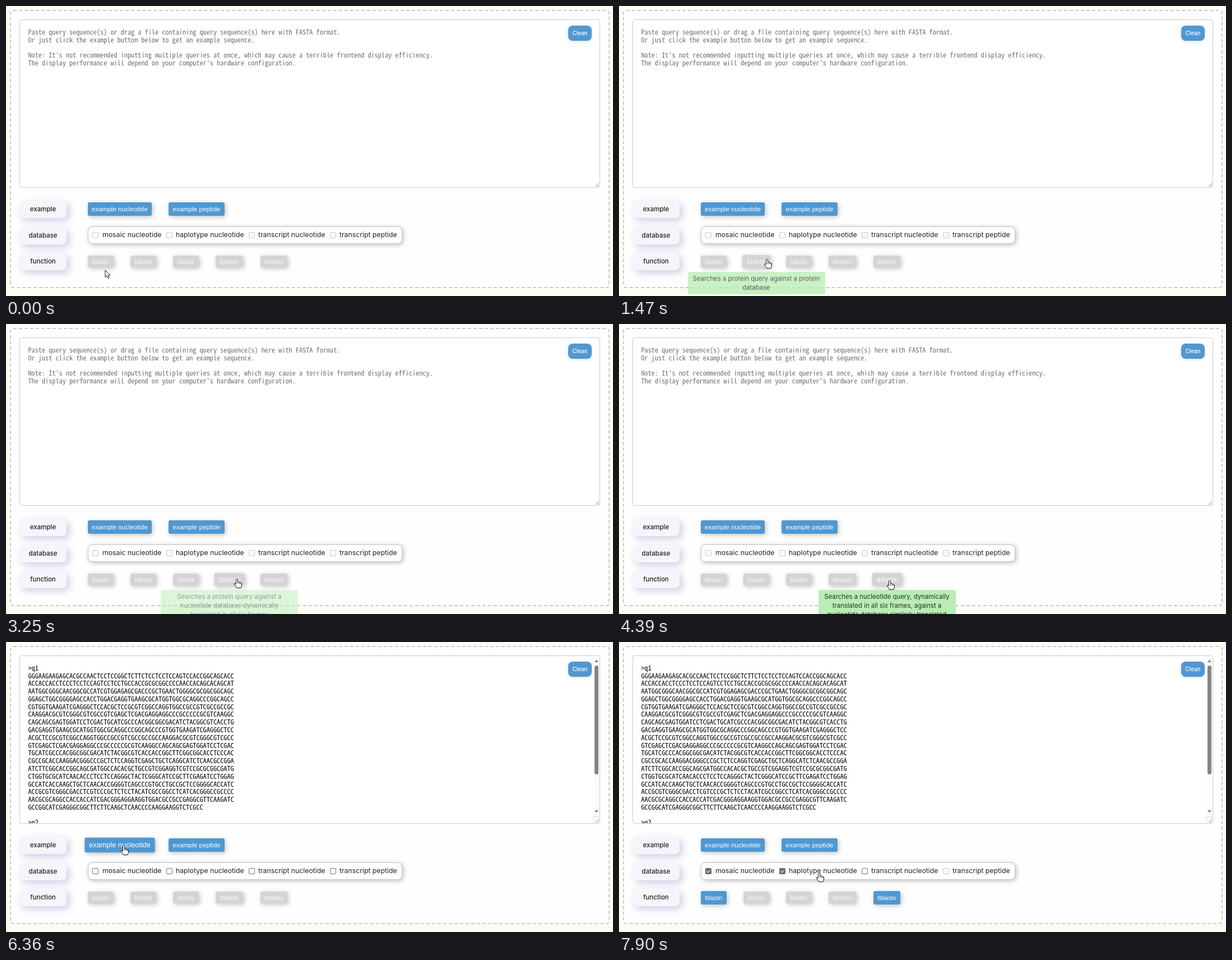
Animation of 1083x517 px, one loop 8000 ms. Source, as an HTML page:

```html
<!DOCTYPE html>
<html lang="en">
<head>
<meta charset="utf-8">
<title>Sequence search form</title>
<style>
  html, body { margin: 0; width: 100%; height: 100%; overflow: hidden; background: #fafdf1; }
  #stage { position: relative; width: 1083px; height: 517px; overflow: hidden; font: 12.25px/16px Inter, sans-serif; color: #222; }
  #stage div, #stage pre, #stage svg { position: absolute; box-sizing: border-box; white-space: pre; margin: 0; }
  #panel { left: 7px; top: 7px; width: 1070px; height: 496px; border: 2px dashed #c5cdc9; border-radius: 6px; background: #fdfefd; }
  #area { left: 24px; top: 24px; width: 1036px; height: 300px; border: 1px solid #ccc; border-radius: 4px; background: #fff; overflow: hidden; }
  #area pre { left: 14.5px; top: 14.8px; font: 300 12.24px/13.78px "Noto Sans Mono CJK SC", "Noto Sans Mono CJK JP", "Liberation Mono", monospace; letter-spacing: calc(6.12px - 1ch); }
  #hint { color: #707070; }
  #seq { color: #000; }
  #area svg { left: 0; top: 0; }
  .tag { left: 24px; width: 84px; height: 31px; border-radius: 8px; background: #f5f5fb; box-shadow: 5px 5px 13px #cfcfe6; font-size: 11.5px; font-weight: 500; line-height: 31px; text-align: center; }
  .btn { border-radius: 3px; background: #5098d2; color: #fff; box-shadow: 2px 2px 8px rgba(0, 0, 0, .24); font: 11.6px "Liberation Sans", sans-serif; text-align: center; }
  #clean { left: 1003px; top: 35px; width: 42px; height: 27px; border-radius: 8px; box-shadow: 0 1px 6px rgba(0, 0, 0, .15); font: 500 9.8px/27px Inter, sans-serif; }
  #data { left: 146px; top: 393px; width: 561px; height: 31px; border: 1px solid #c4c4c4; border-radius: 8px; background: #fff; box-shadow: 2px 2px 8px rgba(0, 0, 0, .25); }
  .box { top: 403px; width: 11px; height: 11px; border: 1px solid #c9c9c9; border-radius: 2px; background: #fafafa; }
  .box.on { border-color: #767676; background: #fff; }
  .box.checked { border-color: #6a6a6a; background: #6a6a6a; }
  .box.checked::after { content: ""; position: absolute; left: 2.5px; top: 0; width: 2.5px; height: 5.5px; border: solid #fff; border-width: 0 1.5px 1.5px 0; transform: rotate(42deg); }
  .tip { top: 474px; width: 245px; padding: 4px 0 3.5px; border-radius: 4px; background: #b9edb5; color: #2d2d2d; font-size: 11.35px; text-align: center; }
  .cursor { left: 0; top: 0; overflow: visible; fill: #fff; stroke: #111; stroke-linejoin: round; }
</style>
</head>
<body>
<div id="stage">
  <div id="panel"></div>
  <div id="area">
<pre id="hint">Paste query sequence(s) or drag a file containing query sequence(s) here with FASTA format.
Or just click the example button below to get an example sequence.

Note: It's not recommended inputting multiple queries at once, which may cause a terrible frontend display efficiency.
The display performance will depend on your computer's hardware configuration.</pre>
<pre id="seq">&gt;q1
GGGAAGAAGAGCACGCCAACTCCTCCGGCTCTTCTCCTCCTCCAGTCCACCGGCAGCACC
ACCACCACCTCCCTCCTCCAGTCCTCCTGCCACCGCGCGGCCCCAACCACAGCACAGCAT
AATGGCGGGCAACGGCGCCATCGTGGAGAGCGACCCGCTGAACTGGGGCGCGGCGGCAGC
GGAGCTGGCGGGGAGCCACCTGGACGAGGTGAAGCGCATGGTGGCGCAGGCCCGGCAGCC
CGTGGTGAAGATCGAGGGCTCCACGCTCCGCGTCGGCCAGGTGGCCGCCGTCGCCGCCGC
CAAGGACGCGTCGGGCGTCGCCGTCGAGCTCGACGAGGAGGCCCGCCCCCGCGTCAAGGC
CAGCAGCGAGTGGATCCTCGACTGCATCGCCCACGGCGGCGACATCTACGGCGTCACCTG
GACGAGGTGAAGCGCATGGTGGCGCAGGCCCGGCAGCCCGTGGTGAAGATCGAGGGCTCC
ACGCTCCGCGTCGGCCAGGTGGCCGCCGTCGCCGCCGCCAAGGACGCGTCGGGCGTCGCC
GTCGAGCTCGACGAGGAGGCCCGCCCCCGCGTCAAGGCCAGCAGCGAGTGGATCCTCGAC
TGCATCGCCCACGGCGGCGACATCTACGGCGTCACCACCGGCTTCGGCGGCACCTCCCAC
CGCCGCACCAAGGACGGGCCCGCTCTCCAGGTCGAGCTGCTCAGGCATCTCAACGCCGGA
ATCTTCGGCACCGGCAGCGATGGCCACACGCTGCCGTCGGAGGTCGTCCGCGCGGCGATG
CTGGTGCGCATCAACACCCTCCTCCAGGGCTACTCGGGCATCCGCTTCGAGATCCTGGAG
GCCATCACCAAGCTGCTCAACACCGGGGTCAGCCCGTGCCTGCCGCTCCGGGGCACCATC
ACCGCGTCGGGCGACCTCGTCCCGCTCTCCTACATCGCCGGCCTCATCACGGGCCGCCCC
AACGCGCAGGCCACCACCATCGACGGGAGGAAGGTGGACGCCGCCGAGGCGTTCAAGATC
GCCGGCATCGAGGGCGGCTTCTTCAAGCTCAACCCCAAGGAAGGTCTCGCC

&gt;q2</pre>
    <svg width="1034" height="298">
      <g id="bar" fill="#858585">
        <path d="M1023 0h11v298h-11z" fill="#fcfcfc"/>
        <path d="M1023 286.5h11M1023.5 286v12" stroke="#ddd"/>
        <path d="M1025 11l3.5-4.5 3.5 4.5zM1025 275l3.5 4.5 3.5-4.5z"/>
        <rect x="1025" y="17" width="7" height="194" rx="3.5"/>
      </g>
      <path d="M1027 297l6-6M1031 297l2-2" stroke="#777" stroke-width=".9"/>
    </svg>
  </div>
  <div id="clean" class="btn">Clean</div>
  <div id="data"></div>
</div>
<script>
const stage = document.getElementById('stage');
const byId = id => document.getElementById(id);

function add(cls, text, style) {
  const el = document.createElement('div');
  el.className = cls;
  el.textContent = text;
  for (const k in style) el.style[k] = style[k] + 'px';
  return stage.appendChild(el);
}
const button = (text, left, top, width, height) =>
  add('btn', text, { left, top, width, height, lineHeight: height });

['example', 'database', 'function'].forEach((name, i) => add('tag', name, { top: 347 + i * 46.5 }));

const boxes = [['mosaic nucleotide', 154, 172], ['haplotype nucleotide', 286, 303],
  ['transcript nucleotide', 433, 450], ['transcript peptide', 578, 595]].map(([text, x, tx]) => {
  add('', text, { left: tx, top: 400 });
  return add('box', '', { left: x });
});

const example = { el: button('example nucleotide', 146, 350, 114, 24), on: 5380, off: 6560 };
button('example peptide', 290, 350, 100, 24);

// name, left, width, hover start, hover end, description
const tools = [
  ['blastn', 146, 46, 380, 820, 'Searches a nucleotide query against a\nnucleotide database'],
  ['blastp', 222, 46, 1200, 1800, 'Searches a protein query against a protein\ndatabase'],
  ['blastx', 298, 46, 2130, 2560, 'Searches a nucleotide query, dynamically\ntranslated in all six frames, against a\nprotein database'],
  ['tblastn', 374, 49, 3060, 3560, 'Searches a protein query against a\nnucleotide database dynamically\ntranslated in all six frames'],
  ['tblastx', 454, 48, 3940, 4720, 'Searches a nucleotide query, dynamically\ntranslated in all six frames, against a\nnucleotide database similarly translated\nin all six frames']
].map(([name, x, w, on, off, text]) => ({
  el: button(name, x, 445, w, 21), on, off,
  tip: add('tip', text, { left: x + w / 2 - 122.5 })
}));

stage.insertAdjacentHTML('beforeend', `
  <svg class="cursor" width="20" height="22"><path d="M0 0V12.5L3 9.8L5.2 14.6L7.3 13.7L5.2 9H9Z"/></svg>
  <svg class="cursor" width="20" height="22"><path d="M-1.6 1.4Q0-1 1.6 1.4V6Q4 5 4.4 6.8Q6.4 5.8 6.8 7.6Q8.5 7 8.5 9V12Q8 14 7 16.5H-.5Q-2 13-5 10Q-4.6 7.8-2.8 8.9L-1.6 10Z"/><path d="M1.6 6v3M4.4 7v2.5M6.8 8v2" stroke-width=".8"/></svg>`);
const [arrow, hand] = document.querySelectorAll('.cursor');

// time, x, y of the pointer tip
const path = [[0, 177, 471], [150, 177, 471], [380, 173, 463], [600, 175, 454], [820, 193, 452],
  [1200, 224, 452], [1470, 264, 451], [1800, 269, 451], [2130, 299, 450], [2430, 322, 450],
  [2560, 346, 451], [3060, 375, 453], [3250, 412, 454], [3560, 424, 455], [3940, 455, 457],
  [4390, 483, 457], [4710, 483, 457], [5100, 360, 416], [5380, 245, 373], [5550, 210, 363],
  [6360, 210, 363], [6560, 214, 376], [6900, 226, 403], [7100, 230, 411], [7220, 230, 411],
  [7750, 350, 411], [7900, 357, 411], [8000, 357, 411]];

const LOAD = 5700, PICK1 = 7100, PICK2 = 7850;
const smooth = u => { u = Math.min(1, Math.max(0, u)); return u * u * (3 - 2 * u); };
const hover = (t, { on, off }, ms) => smooth((t - on) / ms) * (1 - smooth((t - off) / ms));
const mix = (a, b, u) => `rgb(${a.map((v, i) => v + (b[i] - v) * u)})`;

function pointer(t) {
  const i = path.findIndex(p => p[0] > t);
  const [t0, x0, y0] = path[i - 1], [t1, x1, y1] = path[i];
  const u = (t - t0) / (t1 - t0);
  return [x0 + (x1 - x0) * u, y0 + (y1 - y0) * u];
}

function draw(t) {
  const loaded = t >= LOAD, picked = t >= PICK1;
  byId('hint').style.display = loaded ? 'none' : '';
  byId('seq').style.display = byId('bar').style.display = loaded ? '' : 'none';

  for (const b of [example, ...tools]) b.el.style.transform = `scale(${1 + .1 * hover(t, b, 150)})`;
  tools.forEach((b, i) => {
    // enabled buttons are slightly taller than disabled ones
    const active = i % 4 ? 0 : smooth((t - PICK1) / 300), height = 21 + 3 * active;
    b.tip.style.opacity = hover(t, b, 400);
    Object.assign(b.el.style, {
      top: 466 - height + 1.5 * active + 'px',
      height: height + 'px',
      lineHeight: height + 'px',
      backgroundColor: mix([212, 212, 212], [80, 152, 210], active),
      color: mix([247, 247, 247], [255, 255, 255], active)
    });
  });

  boxes.forEach((box, i) => {
    box.classList.toggle('on', loaded && !(i === 3 && picked));
    box.classList.toggle('checked', i === 0 && picked || i === 1 && t >= PICK2);
  });

  const [x, y] = pointer(t);
  const over = t >= 6900 || [example, ...tools].some(b => t >= b.on && t < b.off);
  arrow.style.display = over ? 'none' : '';
  hand.style.display = over ? '' : 'none';
  arrow.style.transform = hand.style.transform = `translate(${x}px, ${y}px)`;
}

const start = performance.now();
function frame() {
  draw((performance.now() - start) % 8000);
  requestAnimationFrame(frame);
}
frame();
</script>
</body>
</html>
```
